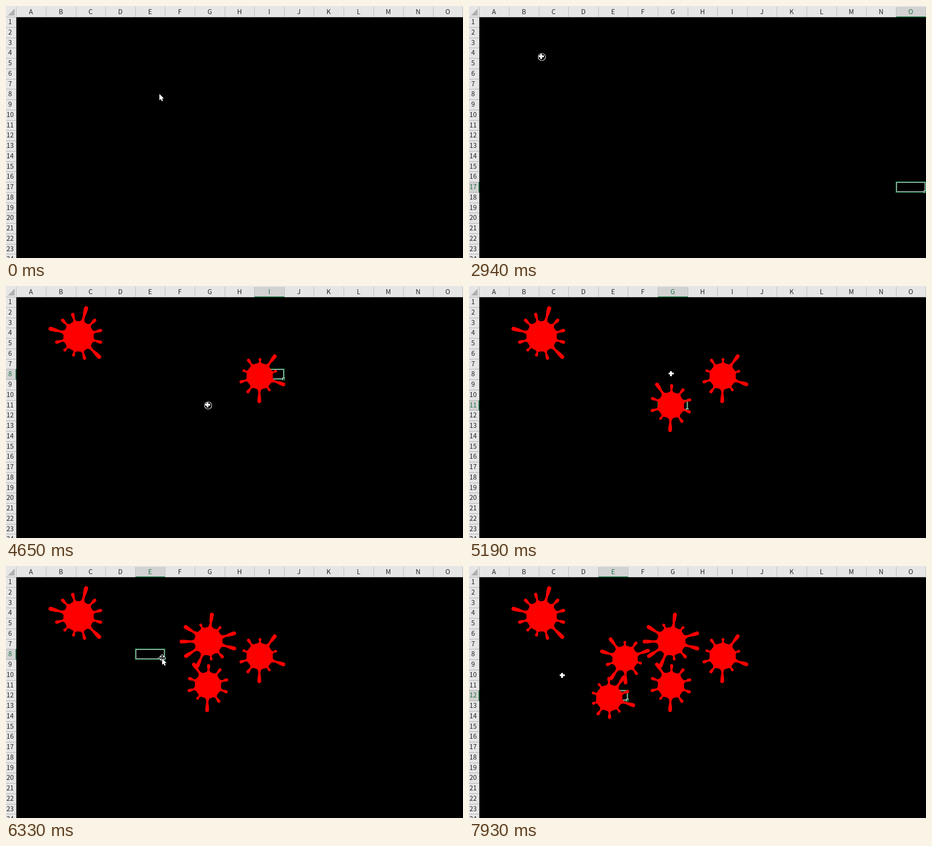
Write an HTML page with a canvas that moves like this. It is 1007 px wide and 556 px high and loops after 8 s.

```html
<!DOCTYPE html>
<html lang="en">
<head>
<meta charset="utf-8">
<style>
  html, body { margin: 0; width: 100%; height: 100%; overflow: hidden; background: #000; }
  canvas { display: block; }
</style>
</head>
<body>
<canvas id="stage" width="1007" height="556"></canvas>
<script>
const ctx = document.getElementById('stage').getContext('2d');
const W = 1007, H = 556, LOOP = 8000;
const LEFT = 22.4, TOP = 24, COL = 65.6, ROW = 22.75;
const GREEN = '#217346', TURN = Math.PI * 2;
const colX = c => Math.round(LEFT + c * COL);
const rowY = r => Math.round(TOP + r * ROW);
const cellAt = (x, y) => ({ col: Math.floor((x - LEFT) / COL), row: Math.floor((y - TOP) / ROW) });

// Pointer: sweeps around, rests, then the first press wakes the sheet.
const SWEEP = [[338, 194], [150, 120], [610, 200], [330, 320], [250, 184], [680, 230], [160, 112]];
const STEP = 290, WAKE = 2070;
const FIRST_CELL = { col: 14, row: 16 };

// After each press the cell is selected, then the splat shows, and the pointer glides on.
const HOLD = 120, SHOW = 240, LEAVE = 225, GLIDE = 450, SAG = 11;
const REACH = { long: 2.05, mid: 1.6, stub: 1.38 };
const EXIT = { x: 206, y: 242 };

// Arms are evenly spaced from a start angle; only long and stubby ones are named.
const splats = [
  { down: 2940, leave: 3510, x: 160, y: 111, r: 33.5, arms: 12, turn: 195, long: [0, 3, 7], stub: [9, 10] },
  { down: 3930, x: 559, y: 199, r: 29, arms: 10, turn: 235, long: [2, 4, 6], stub: [1, 3, 5, 9] },
  { down: 4650, x: 445, y: 263, r: 29, arms: 10, turn: 236, long: [0, 6], stub: [7] },
  { down: 5310, x: 446, y: 166, r: 31, arms: 11, turn: 212, long: [0, 2, 4, 5, 8, 9, 10], stub: [1, 3, 7] },
  { down: 6180, x: 344, y: 204, r: 28, arms: 10, turn: 197, long: [0, 1, 4, 7, 8], stub: [2, 5] },
  { down: 7180, x: 309, y: 291, r: 29, arms: 10, turn: 269, long: [1, 3], stub: [4, 7, 8, 9] }
];
splats.forEach(s => {
  s.leave ??= s.down + LEAVE;
  s.cell = cellAt(s.x, s.y);
  s.path = splatPath(s);
});

function splatPath({ x, y, r, arms, turn, long, stub }) {
  const path = new Path2D();
  path.arc(x, y, r, 0, TURN);
  for (let k = 0; k < arms; k++) {
    const kind = long.includes(k) ? 'long' : stub.includes(k) ? 'stub' : 'mid';
    addArm(path, x, y, r, r * REACH[kind], (turn / 360 + k / arms) * TURN);
  }
  return path;
}

// A teardrop arm: flared root, thin neck, round tip.
function addArm(path, x, y, r, length, angle) {
  const reach = length - r, bulb = 2.4 + reach * 0.06, neck = bulb * 0.55;
  const waist = r + reach * 0.3, end = length - bulb, swell = (waist + end) / 2;
  const cos = Math.cos(angle), sin = Math.sin(angle);
  const at = (u, v) => [x + u * cos - v * sin, y + u * sin + v * cos];
  path.moveTo(...at(r - 1.5, -7));
  path.quadraticCurveTo(...at(r + 1, -neck), ...at(waist, -neck));
  path.quadraticCurveTo(...at(swell, -bulb), ...at(end, -bulb));
  path.arc(...at(end, 0), bulb, angle - TURN / 4, angle + TURN / 4);
  path.quadraticCurveTo(...at(swell, bulb), ...at(waist, neck));
  path.quadraticCurveTo(...at(r + 1, neck), ...at(r - 1.5, 7));
  path.closePath();
}

function sweep(t) {
  const last = SWEEP.length - 1, pos = Math.min(t / STEP, last);
  const i = Math.min(Math.floor(pos), last - 1), u = pos - i;
  const p = k => SWEEP[Math.max(0, Math.min(last, k))];
  return [0, 1].map(axis => {
    const [a, b, c, d] = [-1, 0, 1, 2].map(k => p(i + k)[axis]);
    return b + u / 2 * (c - a + u * (2 * a - 5 * b + 4 * c - d + u * (3 * (b - c) + d - a)));
  });
}

function pointer(t) {
  const i = splats.findLastIndex(s => t >= s.leave);
  if (i < 0) return sweep(t);
  const from = splats[i], to = splats[i + 1] || EXIT;
  const u = Math.min(1, (t - from.leave) / GLIDE), ease = u * u * (3 - 2 * u);
  return [
    from.x + (to.x - from.x) * ease,
    from.y + (to.y - from.y) * ease + SAG * Math.sin(Math.PI * ease)
  ];
}

function selectedCell(t) {
  if (t < WAKE) return null;
  const s = splats.findLast(s => t >= s.down + HOLD);
  return s ? s.cell : FIRST_CELL;
}

function box(color, x, y, w, h) {
  ctx.fillStyle = color;
  ctx.fillRect(x, y, w, h);
}

function polygon(points, fill, stroke) {
  ctx.beginPath();
  points.forEach(p => ctx.lineTo(...p));
  ctx.closePath();
  if (stroke) {
    ctx.strokeStyle = stroke;
    ctx.lineWidth = 2;
    ctx.stroke();
  }
  ctx.fillStyle = fill;
  ctx.fill();
}

function label(text, x, y, on) {
  ctx.fillStyle = on ? GREEN : '#222';
  ctx.fillText(text, x, y);
}

function drawHeaders(cell) {
  const left = colX(0);
  box('#e6e6e6', 0, 0, W, TOP);
  box('#e6e6e6', 0, 0, left, H);
  polygon([[4, 21], [19, 21], [19, 6]], '#b1b1b1');
  box('#9f9f9f', 0, TOP, W, 1);
  box('#9f9f9f', left, TOP, 1, H);
  ctx.font = '300 14.5px "Noto Sans CJK JP", "Noto Sans", sans-serif';
  ctx.textAlign = 'center';
  for (let c = 0; c < 15; c++) {
    const x = colX(c), w = colX(c + 1) - x, on = cell && cell.col === c;
    if (on) {
      box('#d2d2d2', x, 2, w, TOP - 2);
      box(GREEN, x, TOP - 1, w + 1, 2);
    }
    box('#b4b4b4', x, 2, 1, TOP - 2);
    label(String.fromCharCode(65 + c), x + w / 2, 18, on);
  }
  box('#b4b4b4', colX(15), 2, 1, TOP - 2);
  for (let r = 0; r < 24; r++) {
    const y = rowY(r), h = rowY(r + 1) - y, on = cell && cell.row === r;
    if (on) {
      box('#d2d2d2', 0, y, left, h);
      box(GREEN, left - 1, y, 2, h + 1);
    }
    box('#ababab', 0, y, left, 1);
    label(r + 1, 9, y + 16, on);
  }
}

function drawSelection({ col, row }) {
  const x = colX(col), y = rowY(row), r = colX(col + 1), b = rowY(row + 1);
  ctx.strokeStyle = GREEN;
  ctx.lineWidth = 2;
  ctx.strokeRect(x, y, r - x, b - y);
  ctx.strokeStyle = '#fff';
  ctx.lineWidth = 1;
  ctx.strokeRect(x + 1.5, y + 1.5, r - x - 3, b - y - 3);
  box('#fff', r - 4, b - 4, 6, 6);
  box(GREEN, r - 3, b - 3, 5, 5);
}

function drawArrow() {
  polygon([[0, 0], [0, 14], [3.2, 11.2], [5.4, 16], [7.8, 15], [5.8, 10.2], [10, 10]], '#fff', '#000');
}

function drawPlus() {
  box('#000', -4, -7, 6, 13);
  box('#000', -7, -4, 13, 6);
  box('#fff', -3, -6, 4, 11);
  box('#fff', -6, -3, 11, 4);
}

function drawMove() {
  const points = [];
  for (let k = 0; k < 4; k++) {
    const c = Math.round(Math.cos(k * TURN / 4)), s = Math.round(Math.sin(k * TURN / 4));
    for (const [u, v] of [[1, -1], [4, -1], [4, -3], [7, 0], [4, 3], [4, 1], [1, 1]])
      points.push([u * c - v * s, u * s + v * c - 1]);
  }
  polygon(points, '#000', '#fff');
  drawArrow();
}

function drawRing() {
  ctx.strokeStyle = '#fff';
  ctx.lineWidth = 1.2;
  ctx.beginPath();
  ctx.arc(0.5, 0.5, 8, 0, TURN);
  ctx.stroke();
}

function drawCursor(t) {
  const [x, y] = pointer(t);
  const over = splats.some(s => t >= s.down + HOLD && ctx.isPointInPath(s.path, x, y));
  ctx.save();
  ctx.translate(Math.round(x), Math.round(y));
  if (t < WAKE) drawArrow();
  else if (over) drawMove();
  else drawPlus();
  if (splats.some(s => t >= s.down && t < s.down + HOLD)) drawRing();
  ctx.restore();
}

function draw(t) {
  const cell = selectedCell(t);
  box('#000', 0, 0, W, H);
  drawHeaders(cell);
  if (cell) drawSelection(cell);
  ctx.fillStyle = '#f00';
  splats.forEach(s => { if (t >= s.down + SHOW) ctx.fill(s.path); });
  drawCursor(t);
}

const start = performance.now();
function tick() {
  draw((performance.now() - start) % LOOP);
  requestAnimationFrame(tick);
}
tick();
</script>
</body>
</html>
```
